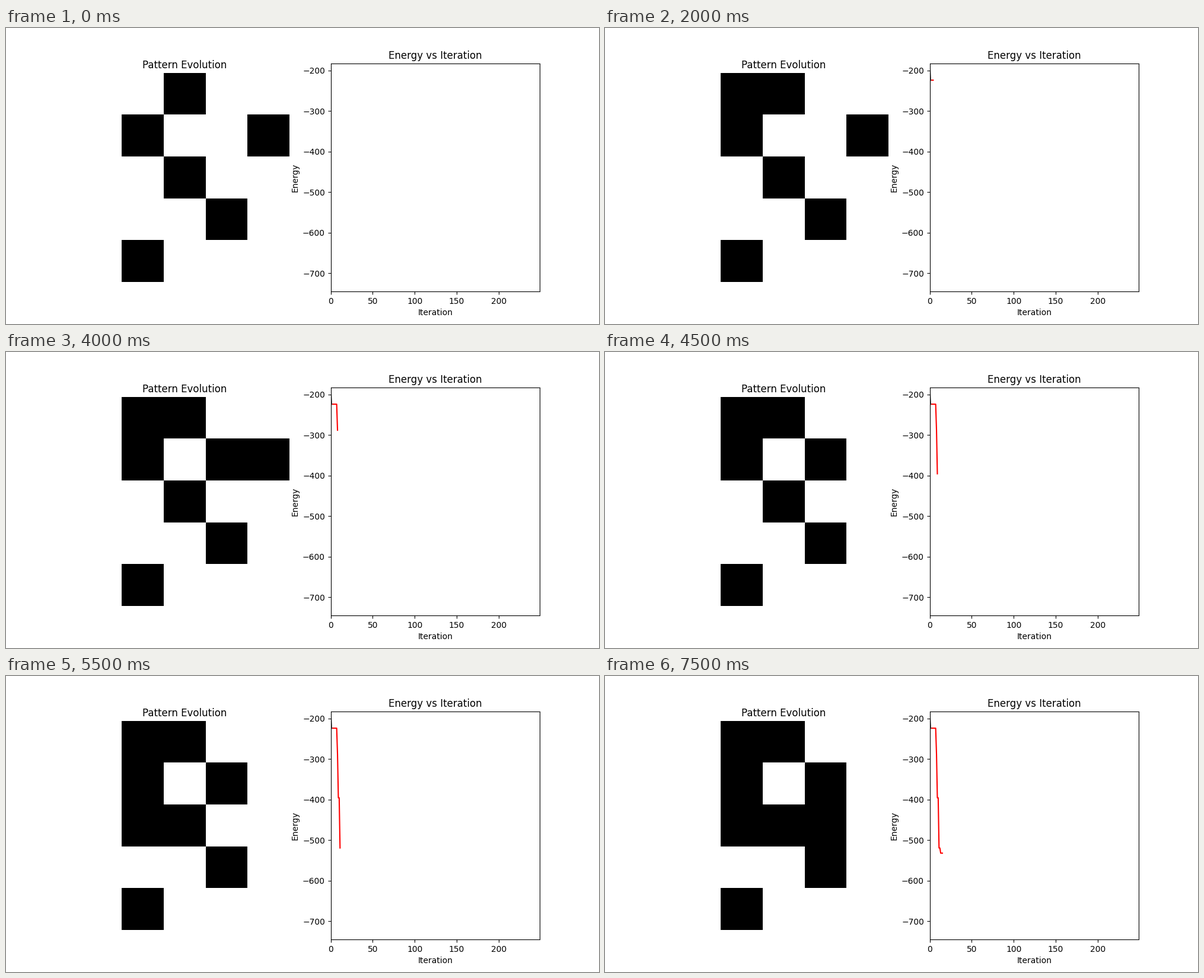
A matplotlib script that plays this animation: 1000x500 px, repeating every 8 s.

```python
import numpy as np
import matplotlib.pyplot as plt
from matplotlib.animation import FuncAnimation

STEPS = 16
STEP_MS = 500
START_ENERGY = -192.5

# (step, row, column, energy lost) for each accepted flip
FLIPS = [(1, 0, 1, 31.2), (8, 1, 3, 64.2), (9, 1, 4, 107.4),
         (11, 2, 1, 123.8), (13, 2, 3, 12.8)]


def start_grid():
    """Diagonals three cells apart, one corner off and one top cell on."""
    row, col = np.indices((5, 5))
    grid = (row > 0) & (col > 0) & ((row - col) % 3 == 0)
    grid[4, 4] = False
    grid[0, 2] = True
    return grid


def state(step):
    """Grid and energy after every flip up to the given step."""
    grid, energy = start_grid(), START_ENERGY
    for when, row, col, loss in FLIPS:
        if when <= step:
            grid[row, col] ^= True
            energy -= loss
    return grid, energy


iters = np.arange(STEPS)
grids, energies = zip(*map(state, iters))

fig, (ax_grid, ax_energy) = plt.subplots(1, 2, figsize=(10, 5), dpi=100)

image = ax_grid.imshow(grids[0], cmap="binary", vmin=0, vmax=1)
ax_grid.set_title("Pattern Evolution")
ax_grid.axis("off")

ax_energy.set(title="Energy vs Iteration", xlabel="Iteration", ylabel="Energy",
              xlim=(0, 249), ylim=(-744.6, -182.6))

trace, = ax_energy.plot([], [], color="red", snap=False)
first_drop, = ax_energy.plot([], [], color="#555555", snap=False)


def update(step):
    image.set_data(grids[step])
    split = min(step, 1) + 1
    first_drop.set_data(iters[:split], energies[:split])
    trace.set_data(iters[1:step + 1], energies[1:step + 1])
    first_drop.set_visible(step > 0)
    trace.set_visible(step > 1)
    return image, trace, first_drop


anim = FuncAnimation(fig, update, frames=STEPS, interval=STEP_MS,
                     repeat=True, repeat_delay=0, blit=False)
plt.show()
```
